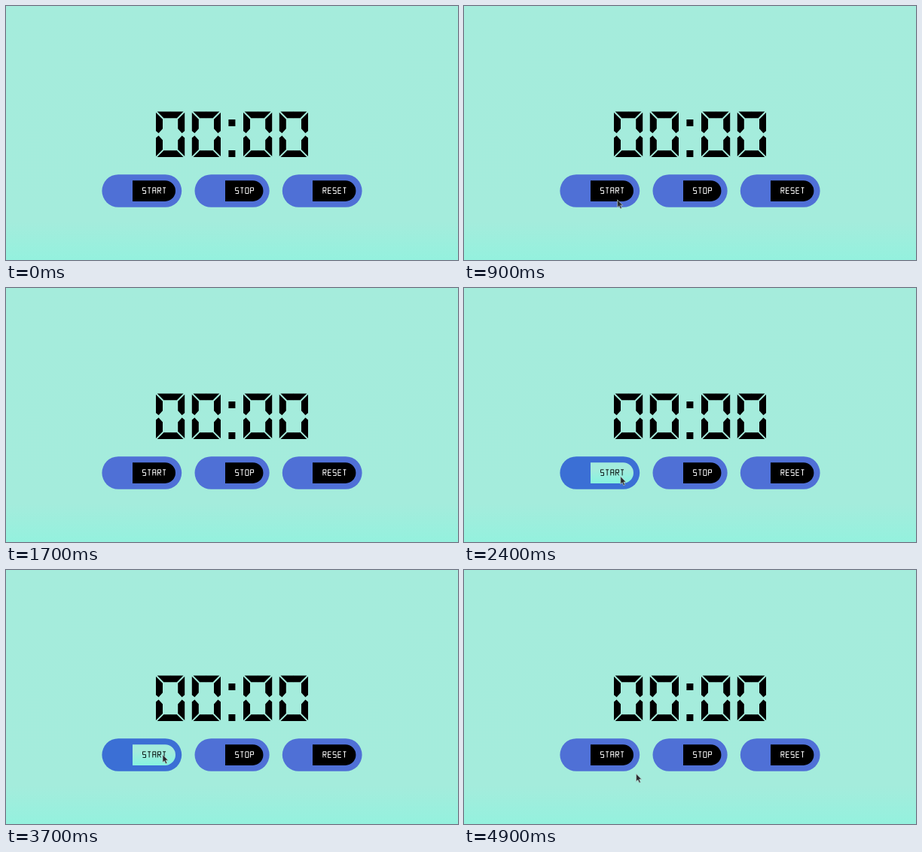
An HTML page for the animation above (5000 ms loop, 600 px wide and 338 px high).

```html
<!DOCTYPE html>
<html lang="en">
<head>
<meta charset="utf-8">
<title>Stopwatch</title>
<style>
  html, body { margin: 0; width: 100%; height: 100%; overflow: hidden; }
  body { background: linear-gradient(#a5ecdc, #a4ecdc 85%, #94f1de); }
  svg { display: block; width: 600px; height: 338px; }
  .body { fill: #4f70d6; }
  .cap { fill: #000; }
  .label { fill: none; stroke: #fff; stroke-width: 1; }
  .hot .body { fill: #3b6fd5; }
  .hot .cap { fill: url(#mint); }
  .hot .label { stroke: #0a1513; }
</style>
</head>
<body>
<svg id="stage" viewBox="0 0 600 338">
  <defs>
    <linearGradient id="mint" x1="0" y1="0" x2="0" y2="1">
      <stop offset=".35" stop-color="#a3ecdc"/>
      <stop offset="1" stop-color="#86f3e0"/>
    </linearGradient>
    <path id="quarter" d="M1.7 0H19.2V8.7H10.4Z M0 1.1L9 10.1V22.6L3.6 28.6L0 25.6Z"/>
  </defs>
</svg>
<script>
const LOOP = 5000, STEP = 100;
const stage = document.getElementById('stage');

function add(parent, tag, attrs) {
  const el = document.createElementNS('http://www.w3.org/2000/svg', tag);
  for (const key in attrs) el.setAttribute(key, attrs[key]);
  return parent.appendChild(el);
}

// Clock face: each zero is one corner mirrored both ways
const clock = add(stage, 'g', { role: 'img', 'aria-label': '00:00' });
for (const cx of [218.1, 265.9, 334.1, 381.9]) {
  for (const sx of [1, -1]) for (const sy of [1, -1]) {
    add(clock, 'use', {
      href: '#quarter',
      transform: `translate(${cx} 170.8) scale(${sx} ${sy}) translate(-19.1 -30.2)`
    });
  }
}
for (const y of [151, 192]) add(clock, 'rect', { x: 295.4, y, width: 9, height: 9 });

// Segment lettering on a 4 x 8 cell
const GLYPHS = {
  S: 'M4 0H0V4H4V8H0',
  T: 'M0 0H4M2 0V8',
  A: 'M0 8V0H4V8M0 4H4',
  R: 'M0 8V0H4V4H0M1.8 4L4 8',
  O: 'M0 0H4V8H0Z',
  P: 'M0 8V0H4V4H0',
  E: 'M4 0H0V8H4M0 4H3.6'
};

function makeButton(word, x) {
  const width = 72.55 + word.length * 6.65;
  const g = add(stage, 'g', { role: 'button', 'aria-label': word });
  add(g, 'rect', { class: 'body', x, y: 224.2, width, height: 43.6, rx: 21.8 });
  const left = Math.round(x + 40.5), bend = x + width - 22;
  add(g, 'path', { class: 'cap', d: `M${left} 232.3H${bend}a13.8 13.8 0 0 1 0 27.6H${left}Z` });
  [...word].forEach((ch, i) => add(g, 'path', {
    class: 'label', d: GLYPHS[ch],
    transform: `translate(${x + 54.1 + i * 6.65} 241.8) scale(1 .96)`
  }));
  return { g, x, width };
}

const buttons = [makeButton('START', 127.4), makeButton('STOP', 250.5), makeButton('RESET', 366.8)];

const pointer = add(stage, 'path', {
  d: 'M0 0V10.2L2.3 8.1L4 12L5.8 11.2L4.1 7.4H7.2Z',
  fill: '#2a2a2e', stroke: '#b9cfcb', 'stroke-width': 0.7, 'stroke-linejoin': 'round'
});

// Key points [ms, x, y] of each pass; the pointer is hidden between passes
const passes = [
  [[300, 423.7, 256.5], [1000, 190.7, 257.9], [1300, 176, 271]],
  [[2000, 184, 338], [2400, 207.8, 250.8], [3700, 208, 245.8], [4300, 246, 305]],
  [[4600, 270, 338], [4900, 228.6, 271.2]]
];

const ease = u => u * u * (3 - 2 * u);

function pointAt(t) {
  const pass = passes.find(p => t >= p[0][0] && t <= p[p.length - 1][0]);
  if (!pass) return null;
  const i = Math.max(1, pass.findIndex(key => key[0] >= t));
  const [t0, x0, y0] = pass[i - 1], [t1, x1, y1] = pass[i];
  const k = ease((t - t0) / (t1 - t0));
  return { x: x0 + (x1 - x0) * k, y: y0 + (y1 - y0) * k };
}

const inside = (p, b) => p && p.x >= b.x && p.x <= b.x + b.width && p.y >= 224 && p.y <= 268;

function draw(ms) {
  const t = Math.floor((ms % LOOP) / STEP) * STEP;
  const now = pointAt(t);
  const before = pointAt(t - STEP) || now;
  pointer.setAttribute('visibility', now ? 'visible' : 'hidden');
  if (now) pointer.setAttribute('transform', `translate(${now.x} ${now.y})`);
  // Hover lights up one step after the pointer arrives
  for (const b of buttons) b.g.classList.toggle('hot', !!(inside(now, b) && inside(before, b)));
}

const start = performance.now();
function tick() {
  draw(performance.now() - start);
  requestAnimationFrame(tick);
}
tick();
</script>
</body>
</html>
```
